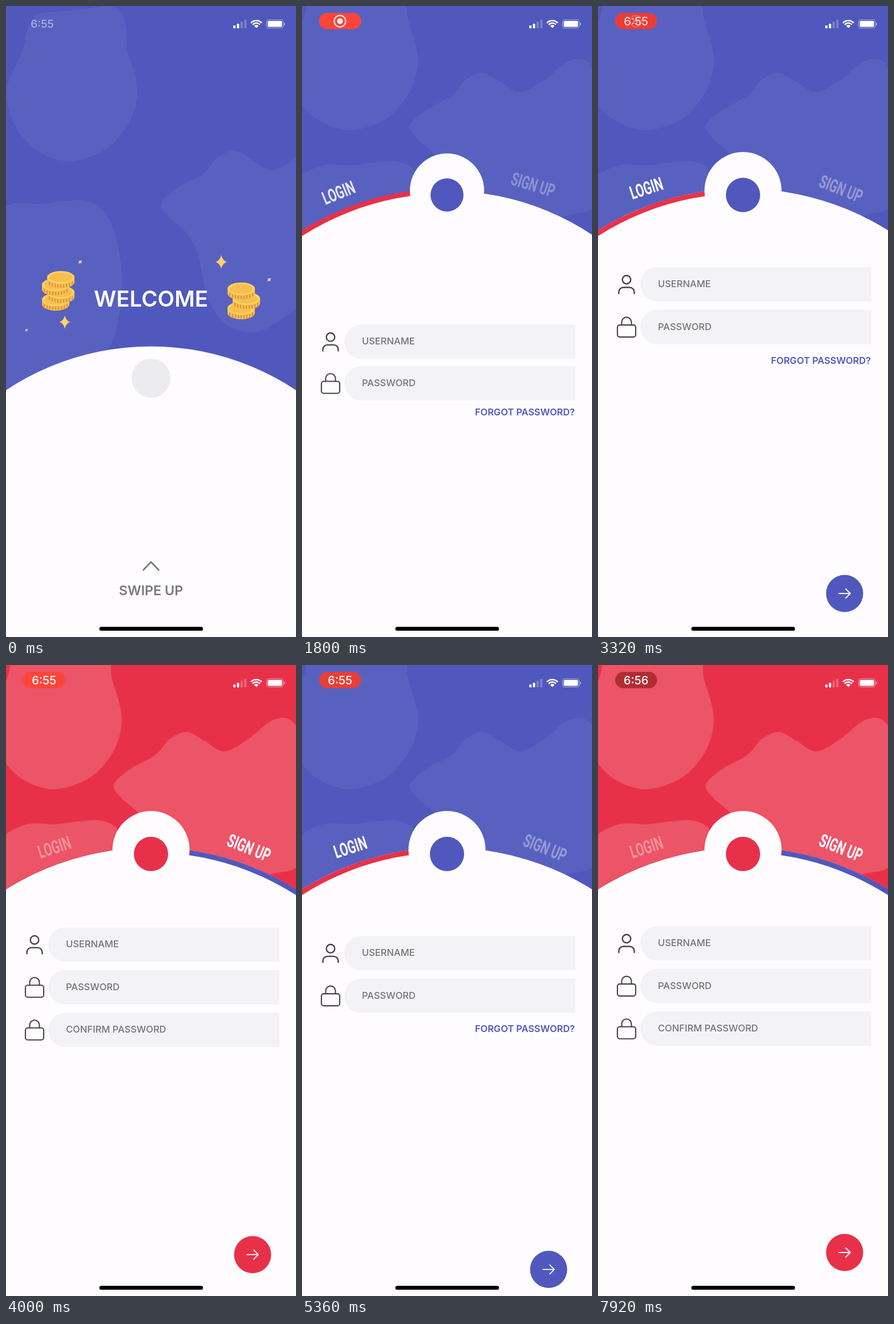
An HTML page with a canvas that plays this animation: 508x1102 px, repeating every 7.96 s.

```html
<!DOCTYPE html>
<html lang="en">
<head>
<meta charset="utf-8">
<title>Welcome and login</title>
<style>
  html, body { margin: 0; width: 100%; height: 100%; overflow: hidden; background: #fefcff; }
  canvas { display: block; }
</style>
</head>
<body>
<canvas id="stage" width="508" height="1102"></canvas>
<script>
const ctx = document.getElementById('stage').getContext('2d');
const W = 508, H = 1102, MID = W / 2, LOOP = 7960;
const BLUE = [80, 88, 189], RED = [232, 49, 72], PAPER = [254, 252, 255];
const GRAY = '#79787b', INK = '#454348', UI = 'Inter, sans-serif';

// Form switches: start time and the tab they lead to (1 = sign up).
const SWITCHES = [[3320, 1], [4820, 0], [6560, 1]];
const WIPE = 400, FORM_OUT = 320, FORM_IN = 500;

const clamp = v => Math.min(1, Math.max(0, v));
const lerp = (a, b, k) => a + (b - a) * k;
const span = (t, from, to) => clamp((t - from) / (to - from));
const inOut = u => u * u * (3 - 2 * u);
const cube = v => v * v * v;
const mix = (a, b, k) => a.map((v, i) => lerp(v, b[i], k));
const rgb = c => `rgb(${c.map(Math.round).join(',')})`;

function keyed(keys, t) {
  for (let i = 1; i < keys.length; i++) {
    const [t0, v0] = keys[i - 1], [t1, v1] = keys[i];
    if (t <= t1) return lerp(v0, v1, span(t, t0, t1));
  }
  return keys[keys.length - 1][1];
}

function group(alpha, draw) {
  if (alpha <= 0) return;
  ctx.save();
  ctx.globalAlpha *= alpha;
  draw();
  ctx.restore();
}

function disc(x, y, r, color) {
  ctx.beginPath();
  ctx.arc(x, y, r, 0, Math.PI * 2);
  ctx.fillStyle = color;
  ctx.fill();
}

function pill(x, y, w, h, r, color) {
  ctx.beginPath();
  ctx.roundRect(x, y, w, h, r);
  ctx.fillStyle = color;
  ctx.fill();
}

function line(path, color, width) {
  ctx.strokeStyle = color;
  ctx.lineWidth = width;
  ctx.lineCap = ctx.lineJoin = 'round';
  ctx.stroke(new Path2D(path));
}

function text(str, x, y, font, color, align = 'center') {
  ctx.font = font;
  ctx.fillStyle = color;
  ctx.textAlign = align;
  ctx.textBaseline = 'alphabetic';
  ctx.fillText(str, x, y);
}

// Closed Catmull-Rom curve through the points.
function smooth(points) {
  const n = points.length, at = i => points[(i + n) % n];
  const path = new Path2D();
  path.moveTo(...at(0));
  for (let i = 0; i < n; i++) {
    const [a, b, c, d] = [at(i - 1), at(i), at(i + 1), at(i + 2)];
    path.bezierCurveTo(b[0] + (c[0] - a[0]) / 6, b[1] + (c[1] - a[1]) / 6,
      c[0] - (d[0] - b[0]) / 6, c[1] - (d[1] - b[1]) / 6, c[0], c[1]);
  }
  return path;
}

const BLOBS = [
  { shift: [-27, -54], path: smooth([[0, 155], [12, 115], [30, 75], [38, 40], [55, 15], [90, 10],
    [140, 5], [180, 0], [202, 12], [210, 40], [212, 75], [224, 115], [230, 155], [215, 205],
    [175, 250], [112, 271], [55, 253], [18, 212]]) },
  { shift: [-83, -136], path: smooth([[272, 345], [300, 318], [345, 293], [370, 265], [400, 253],
    [430, 268], [465, 287], [505, 267], [553, 231], [591, 241], [640, 330], [640, 440], [591, 490],
    [546, 502], [508, 528], [470, 556], [430, 570], [385, 556], [355, 515], [345, 475],
    [335, 430], [315, 395], [285, 368]]) },
  { shift: [28, -68], path: smooth([[-60, 420], [-35, 370], [10, 346], [60, 346], [100, 341],
    [140, 340], [168, 355], [188, 390], [200, 440], [203, 490], [196, 550], [180, 595],
    [120, 640], [40, 660], [-40, 650]]) }
];

// Everything about the tabs and form that depends on time.
function tabState(t) {
  let tab = 0, signup = 0, strip = span(t, 1450, 1700), settle = 0;
  const u = span(t, 1400, 2600);
  let form = { tab: 0, alpha: span(t, 1400, 1600), scale: 1, drop: 340 * cube(1 - u) };
  for (const [start, next] of SWITCHES) {
    const dt = t - start;
    if (dt <= 0) break;
    settle = 1;
    signup = lerp(tab, next, inOut(clamp(dt / WIPE)));
    strip = dt < WIPE ? 1 - span(dt, 0, 100) : span(dt, WIPE, WIPE + 90);
    if (dt < FORM_OUT) {
      const alpha = 1 - (dt / FORM_OUT) ** 2;
      form = { tab, alpha, scale: 1 - 0.056 * (1 - alpha), drop: 0 };
    } else {
      const k = clamp((dt - FORM_OUT) / FORM_IN);
      form = { tab: next, alpha: clamp(k * 3), scale: 1, drop: 100 * cube(1 - k) };
    }
    tab = next;
  }
  return { signup, strip, form, settle, stripTab: signup > 0.5 ? 1 : 0 };
}

function header(rise, state) {
  const radius = lerp(460, 480, state.settle);
  const top = lerp(594.5, lerp(323, 319, state.settle), rise);
  const cy = top + radius;
  const bottom = top + 120;
  const edge = state.signup * W;

  ctx.save();
  ctx.beginPath();
  ctx.rect(0, 0, W, H * 2);
  ctx.arc(MID, cy, radius, 0, Math.PI * 2);
  ctx.clip('evenodd');
  ctx.fillStyle = rgb(BLUE);
  ctx.fillRect(0, 0, W, bottom);
  ctx.fillStyle = rgb(RED);
  ctx.fillRect(0, 0, edge, bottom);
  ctx.fillStyle = `rgba(255,255,255,${lerp(0.05, 0.17, cube(state.signup))})`;
  for (const { shift, path } of BLOBS) {
    ctx.save();
    ctx.translate(shift[0] * rise, shift[1] * rise);
    ctx.fill(path);
    ctx.restore();
  }
  ctx.restore();

  group(state.strip, () => {
    ctx.beginPath();
    ctx.rect(state.stripTab ? MID : 0, 0, MID, H);
    ctx.clip();
    ctx.beginPath();
    ctx.arc(MID, lerp(594.5, 319, rise) + 480, 475.7, Math.PI, 0);
    ctx.strokeStyle = rgb(state.stripTab ? BLUE : RED);
    ctx.lineWidth = 8.6;
    ctx.stroke();
  });
}

function tabLabel(str, angle, tilt, turn, alpha) {
  group(alpha, () => {
    ctx.translate(MID, 799);
    ctx.rotate((angle + turn) * Math.PI / 180);
    ctx.translate(0, -510);
    ctx.rotate((tilt + turn * 0.8) * Math.PI / 180);
    ctx.scale(0.64, 1); // condensed face
    text(str, 0, 11.5, '600 32px Roboto, sans-serif', '#fff');
  });
}

function tabs(t, rise, state) {
  const left = 1 - span(t, 1200, 2076);
  const turn = -80 * cube(left);
  const shown = span(t, 1200, 1900);
  tabLabel('LOGIN', -19.4, 1.5, turn, shown * lerp(1, 0.36, state.signup));
  tabLabel('SIGN UP', 19.7, 2, turn, shown * lerp(0.36, 1, state.signup));

  const r = 67.5 - 33.5 * left ** 2.25;
  disc(MID, lerp(650, 322.5, rise), r, rgb(mix([236, 235, 238], PAPER, rise)));
  group(span(t, 1350, 1650), () =>
    disc(MID, lerp(650, 330, rise), 30 * r / 67.5, rgb(mix(BLUE, RED, state.signup))));
}

function scaled(x, y, scale, draw) {
  ctx.save();
  ctx.translate(x, y);
  ctx.scale(scale, scale);
  draw();
  ctx.restore();
}

function userIcon() {
  line('M7.3 -8a7.3 7.3 0 1 1 -14.6 0a7.3 7.3 0 1 1 14.6 0Z', INK, 2.4);
  line('M-13.5 16v-2.5a8 8 0 0 1 8 -8h11a8 8 0 0 1 8 8v2.5', INK, 2.4);
}

function lockIcon() {
  line('M-12 -3.5h24a4 4 0 0 1 4 4v13a4 4 0 0 1 -4 4h-24a4 4 0 0 1 -4 -4v-13a4 4 0 0 1 4 -4Z', INK, 2.1);
  line('M-8.5 -3.5v-5a8.5 8.5 0 0 1 17 0v5', INK, 2.1);
}

function field(label, icon, y, scale) {
  scaled(50, y, scale, icon);
  scaled(276.5, y, scale, () => {
    pill(-202.5, -30, 405, 60, [30, 0, 0, 30], '#f3f2f5');
    text(label, -171.5, 5, `500 16.5px ${UI}`, '#757478', 'left');
  });
}

function form({ tab, alpha, scale, drop }) {
  group(alpha, () => {
    const rows = [['USERNAME', userIcon], ['PASSWORD', lockIcon]];
    if (tab) rows.push(['CONFIRM PASSWORD', lockIcon]);
    rows.forEach(([label, icon], i) =>
      field(label, icon, 486 + i * 74.6 + drop * (1 - 0.02 * i), scale));
    if (!tab) {
      scaled(390.5, 619 + drop * 0.9, scale, () =>
        text('FORGOT PASSWORD?', 87.5, 6, `600 16.4px ${UI}`, rgb(BLUE), 'right'));
    }
    scaled(432, 1026 + drop * 1.7, scale, () => {
      disc(0, 0, 32.5, rgb(tab ? RED : BLUE));
      line('M-10 0H10M2 -8L10 0L2 8', '#fff', 1.8);
    });
  });
}

function coin(x, y) {
  const rx = 24, ry = 11, depth = 8;
  ctx.beginPath();
  ctx.ellipse(x, y + depth, rx, ry, 0, 0, Math.PI);
  ctx.ellipse(x, y, rx, ry, 0, Math.PI, Math.PI * 2);
  ctx.closePath();
  ctx.fillStyle = '#f6bd4d';
  ctx.fill();
  for (let i = -4; i <= 4; i++) {
    const dx = i * 5, dy = ry * Math.sqrt(1 - (dx / rx) ** 2);
    ctx.fillStyle = '#df8b3d';
    ctx.fillRect(x + dx - 0.9, y + dy + 1, 1.8, depth - 2);
  }
  ctx.beginPath();
  ctx.ellipse(x, y, rx, ry, 0, 0, Math.PI * 2);
  ctx.fillStyle = '#fbd15d';
  ctx.fill();
  ctx.beginPath();
  ctx.ellipse(x, y, rx - 4, ry - 2.5, 0, 0, Math.PI * 2);
  ctx.fillStyle = '#f6bf50';
  ctx.fill();
}

function star(x, y, r, turn, color) {
  const bend = 0.2 * r, side = 0.8 * r;
  ctx.save();
  ctx.translate(x, y);
  ctx.rotate(turn);
  ctx.beginPath();
  ctx.moveTo(0, -r);
  ctx.quadraticCurveTo(bend, -bend, side, 0);
  ctx.quadraticCurveTo(bend, bend, 0, r);
  ctx.quadraticCurveTo(-bend, bend, -side, 0);
  ctx.quadraticCurveTo(-bend, -bend, 0, -r);
  ctx.fillStyle = color;
  ctx.fill();
  ctx.restore();
}

function welcome(t, rise) {
  group(1 - rise * 2, () => {
    ctx.translate(0, -272 * rise);
    text('WELCOME', MID, 525, `600 38.5px ${UI}`, '#fff');
    for (let i = 3; i >= 0; i--) coin(i % 2 ? 87 : 96, 474 + i * 13);
    for (let i = 2; i >= 0; i--) coin(i % 2 ? 421 : 412, 494 + i * 17);
    const beat = (1 - Math.cos(t * Math.PI * 2 / 1600)) / 2;
    const big = lerp(12, 5, beat), small = lerp(4.5, 9, beat);
    star(377, 447, big, 0, '#fbd368');
    star(103, 552, big * 0.95, 0, '#fbd368');
    const turn = lerp(Math.PI / 4, 0, beat);
    star(130, 447, small, turn, '#fbd09a');
    star(461, 478, small, turn, '#fbd09a');
    star(36, 566, small * 0.75, turn, '#fbd09a');
  });
  group(1 - rise * 2.5, () => {
    line('M240.5 985L254 971L267.5 985', GRAY, 2.7);
    text('SWIPE UP', MID, 1028.5, `600 23.3px ${UI}`, GRAY);
  });
}

function statusBar(t) {
  group(0.5 * (1 - span(t, 0, 300)), () =>
    text('6:55', 63.5, 38, `500 19px ${UI}`, '#fff'));

  const dark = keyed([[0, 0], [2600, 0], [3320, 0.27], [3700, 0], [4300, 0], [5360, 0.27],
    [6000, 0], [6760, 0.42], [7200, 0], [7920, 0.95]], t);
  const clock = span(t, 3120, 3370);
  group(span(t, 200, 500), () => {
    pill(30, 12, 73.5, 28.5, 14.25, rgb(mix([255, 69, 58], [172, 44, 52], dark)));
    group(1 - clock, () => {
      ctx.beginPath();
      ctx.arc(66.5, 26.5, 10, 0, Math.PI * 2);
      ctx.strokeStyle = '#fff';
      ctx.lineWidth = 1.8;
      ctx.stroke();
      disc(66.5, 26.5, 5, '#fff');
    });
    group(clock, () =>
      text(t < 6000 ? '6:55' : '6:56', 66.7, 33.5, `500 20px ${UI}`, '#fff'));
  });

  [5, 8, 11.5, 15].forEach((h, i) =>
    pill(398 + i * 6.4, 39 - h, 4, h, 1, i < 2 ? '#fff' : 'rgba(255,255,255,.25)'));

  ctx.save();
  ctx.translate(438.5, 38.5);
  ctx.strokeStyle = '#fff';
  ctx.lineWidth = 2.6;
  ctx.lineCap = 'butt';
  for (const r of [13, 8.7]) {
    ctx.beginPath();
    ctx.arc(0, 0, r, -Math.PI * 0.76, -Math.PI * 0.24);
    ctx.stroke();
  }
  ctx.beginPath();
  ctx.moveTo(0, 0);
  ctx.arc(0, 0, 5.4, -Math.PI * 0.76, -Math.PI * 0.24);
  ctx.fillStyle = '#fff';
  ctx.fill();
  ctx.restore();

  ctx.beginPath();
  ctx.roundRect(456.5, 24, 29, 14.5, 4);
  ctx.strokeStyle = 'rgba(255,255,255,.5)';
  ctx.lineWidth = 1.2;
  ctx.stroke();
  pill(458.5, 26, 25, 10.5, 2.2, '#fff');
  pill(487, 29, 1.6, 5, 0.8, 'rgba(255,255,255,.5)');
}

function draw() {
  const t = performance.now() % LOOP;
  const rise = inOut(span(t, 950, 1700));
  const state = tabState(t);
  ctx.fillStyle = rgb(PAPER);
  ctx.fillRect(0, 0, W, H);
  header(rise, state);
  tabs(t, rise, state);
  form(state.form);
  welcome(t, rise);
  statusBar(t);
  pill(163.5, 1084.3, 181.5, 6.7, 3.35, '#000');
  requestAnimationFrame(draw);
}
draw();
</script>
</body>
</html>
```
